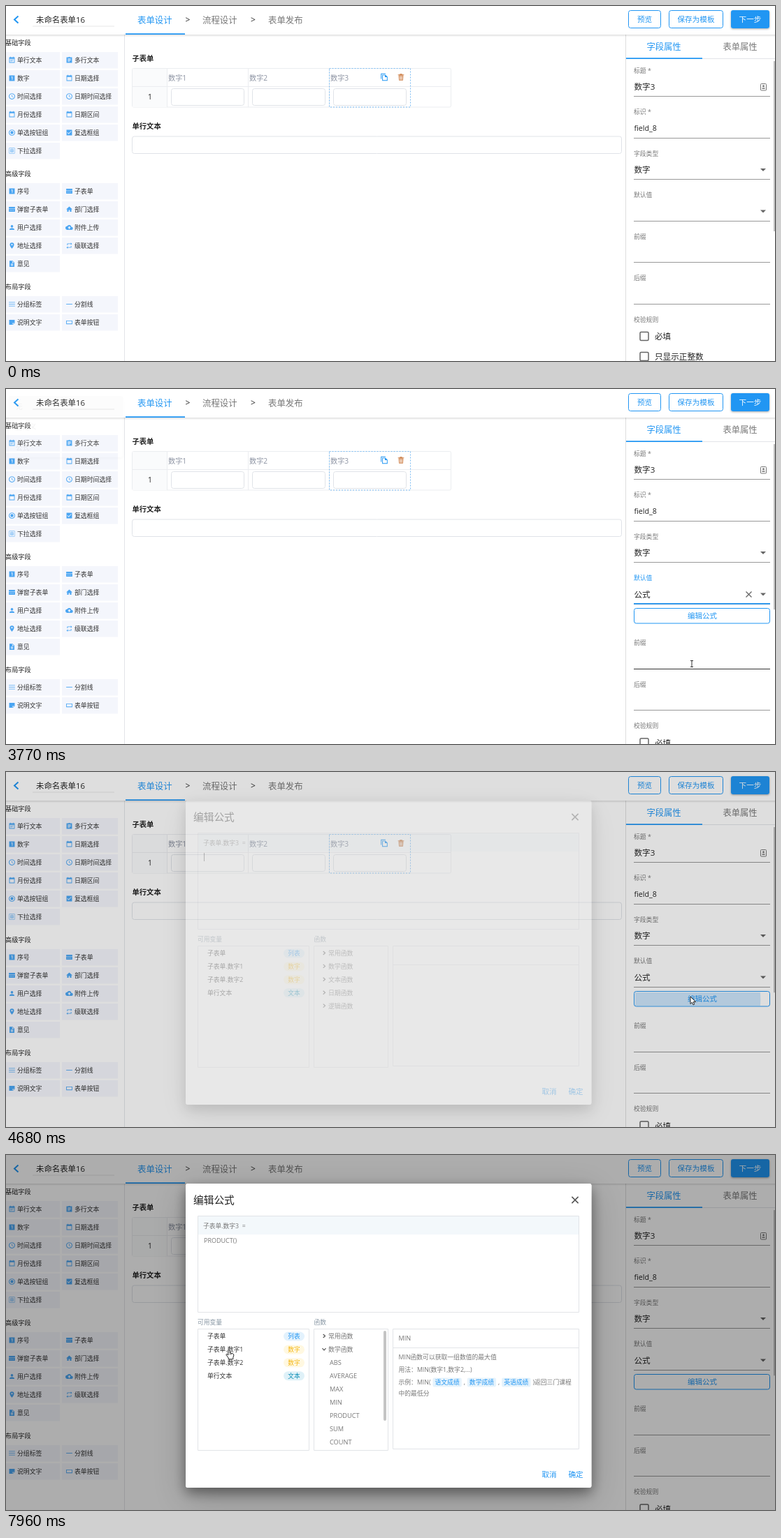
An HTML page with a canvas that plays this animation: 1100x509 px, repeating every 8 s.

```html
<!DOCTYPE html>
<html lang="zh-CN">
<head>
<meta charset="utf-8">
<style>
html, body { margin: 0; width: 100%; height: 100%; overflow: hidden; background: #fff; }
canvas { display: block; width: 1100px; height: 509px; }
</style>
</head>
<body>
<canvas id="stage" width="1100" height="509"></canvas>
<script>
const W = 1100, H = 509, LOOP = 8000;
const stage = document.getElementById('stage').getContext('2d');
const sheet = new OffscreenCanvas(W, H).getContext('2d');
let ctx = stage;
const BLUE = '#2196f3', INK = '#222', GREY = '#777', LINE = '#e2e4e8';

// Times of the hard changes, in ms
const T = { menuOpen: 2270, choose: 3520, edit: 4330, dialog: 4500, expand: 5930, insert: 7080 };

const clamp = v => Math.max(0, Math.min(1, v));
const smooth = v => (v = clamp(v), v * v * (3 - 2 * v));
const ramp = (t, start, length) => smooth((t - start) / length);

// ---------- drawing helpers ----------
function setFont(size, weight = 400) {
  ctx.font = `${weight} ${size}px "Open Sans", "Noto Sans CJK SC", "Noto Sans CJK", sans-serif`;
}
function text(str, x, y, size, color = INK, { weight = 400, align = 'left' } = {}) {
  setFont(size, weight);
  ctx.fillStyle = color;
  ctx.textAlign = align;
  ctx.fillText(str, x, y + size * 0.37);
  return ctx.measureText(str).width;
}
function box(x, y, w, h, { fill, stroke, r = 0, dash = [], width = 1 } = {}) {
  ctx.beginPath();
  ctx.roundRect(x, y, w, h, r);
  if (fill) { ctx.fillStyle = fill; ctx.fill(); }
  if (stroke) {
    ctx.strokeStyle = stroke;
    ctx.lineWidth = width;
    ctx.setLineDash(dash);
    ctx.stroke();
    ctx.setLineDash([]);
  }
}
function poly(points, color, width = 1) {
  ctx.beginPath();
  points.forEach(([x, y]) => ctx.lineTo(x, y));
  ctx.strokeStyle = color;
  ctx.lineWidth = width;
  ctx.stroke();
}
function layer(draw) { ctx.save(); draw(); ctx.restore(); }
// Draws on a separate sheet, so that overlapping parts fade as one
function fadeGroup(alpha, draw) {
  ctx = sheet;
  ctx.clearRect(0, 0, W, H);
  layer(draw);
  ctx = stage;
  ctx.globalAlpha = alpha;
  ctx.drawImage(sheet.canvas, 0, 0);
  ctx.globalAlpha = 1;
}
function raisedBox(x, y, w, h, r, shadows) {
  for (const [alpha, blur, dy] of shadows) layer(() => {
    ctx.shadowColor = `rgba(0,0,0,${alpha})`;
    ctx.shadowBlur = blur;
    ctx.shadowOffsetY = dy;
    box(x, y, w, h, { fill: '#fff', r });
  });
}
function cross(x, y, s, color, width) {
  poly([[x - s, y - s], [x + s, y + s]], color, width);
  poly([[x - s, y + s], [x + s, y - s]], color, width);
}
function caretTriangle(x, y, color, up) {
  const d = up ? -2 : 2;
  ctx.beginPath();
  ctx.moveTo(x - 4, y - d); ctx.lineTo(x + 4, y - d); ctx.lineTo(x, y + d);
  ctx.fillStyle = color;
  ctx.fill();
}

// ---------- icons on a 24-unit grid ----------
const CAL = 'M3 3h3V1h2v2h8V1h2v2h3v18H3zM5 8v11h14V8z';
const RING = 'M12 2a10 10 0 1 0 .01 0zM12 4a8 8 0 1 1-.01 0z';
const ICONS = {
  cal: CAL,
  event: CAL + 'M7 10h10v2H7zM7 14h7v2H7z',
  clip: 'M3 3h6l3-2 3 2h6v18H3zM7 7v2h10V7zM7 11v2h10v-2zM7 15v2h7v-2z',
  one: 'M3 3h18v18H3zM10 7v2h2v8h2V7z',
  clock: RING + 'M11 7h1.6v5l4 2.4-.8 1.3-4.8-2.9z',
  radio: RING + 'M12 7a5 5 0 1 0 .01 0z',
  check: 'M3 3h18v18H3zM10 17l9-9-1.4-1.4-7.6 7.6-3.6-3.6L5 12z',
  select: 'M3 3h18v18H3zM4 4v16h16V4zM8 7h8v1.3H8zM8 11h8v1.3H8zM8 15h8v1.3H8zM7 7h1v10H7zM16 7h1v10h-1z',
  table: 'M2 4h20v16H2zM2 9h20v1.5H2zM5 14h3v2H5zM10 14h3v2h-3zM15 14h3v2h-3z',
  home: 'M10 20v-6h4v6h5v-8h3L12 3 2 12h3v8z',
  person: 'M12 4a4 4 0 1 0 .01 0zM4 20v-2c0-3 5-4 8-4s8 1 8 4v2z',
  cloud: 'M19 10a7.5 7.5 0 0 0-14-2A6 6 0 0 0 6 20h13a5 5 0 0 0 0-10zM14 13v4h-4v-4H7l5-5 5 5z',
  pin: 'M12 2a7 7 0 0 0-7 7c0 5 7 13 7 13s7-8 7-13a7 7 0 0 0-7-7zM12 6.5a2.5 2.5 0 1 1-.01 0z',
  repeat: 'M7 7h10v3l4-4-4-4v3H5v6h2zM17 17H7v-3l-4 4 4 4v-3h12v-6h-2z',
  doc: 'M4 2h10l6 6v14H4zM8 12v2h8v-2zM8 16v2h8v-2zM13 3.5V9h5.5z',
  lines: 'M2 5h20v1.7H2zM2 11h20v1.7H2zM2 17h20v1.7H2z',
  minus: 'M2 11h20v2H2z',
  note: 'M3 4h18v11l-6 5H3zM14 19v-5h6z',
  button: 'M2 6h20v12H2zM4 8v8h16V8z',
  copy: 'M16 1H2v16h2V3h12zM6 5h10l6 6v12H6zM8 7v14h12v-9h-6V7z',
  trash: 'M3 4h5V2h8v2h5v2H3zM5 7h14l-1 15H6zM8 9v11h1.7V9zM11.2 9v11h1.7V9zM14.4 9v11H16V9z'
};
for (const name in ICONS) ICONS[name] = new Path2D(ICONS[name]);
function icon(name, cx, cy, size, color) {
  layer(() => {
    ctx.translate(cx - size / 2, cy - size / 2);
    ctx.scale(size / 24, size / 24);
    ctx.fillStyle = color;
    ctx.fill(ICONS[name], 'evenodd');
  });
}

// ---------- pointer ----------
const POINTERS = {
  arrow: new Path2D('M0 0v10.5l2.4-2.3 1.6 3.6 1.8-.8-1.6-3.4h3.4z'),
  hand: new Path2D('M-1.2.6q1.2-1.6 2.4 0v4.2l4.2 1q1.6.5 1.4 2.4l-1 3.4v2.2H-.8v-1.8L-4 7.6q-.2-1.8 1.6-.8l1.2 1.2z')
};
const PATH = [
  [260, 1005, 485, 'arrow'], [950, 522, 94, 'hand'], [1080, 527, 92, 'hand'], [1280, 527, 92, 'hand'],
  [2060, 1000, 296, 'hand'], [2270, 1000, 296, 'hand'], [2540, 996, 327, 'hand'], [2680, 996, 327, 'hand'],
  [2960, 985, 364, 'hand'], [3160, 985, 364, 'hand'], [3300, 982, 396, 'hand'], [3560, 981, 394, 'text'],
  [3850, 981, 394, 'text'], [4000, 980, 350, 'hand'], [4220, 979, 322, 'hand'], [4420, 979, 322, 'arrow'],
  [4700, 979, 322, 'arrow'], [5080, 580, 305, 'arrow'], [5300, 500, 285, 'hand'], [5600, 478, 276, 'hand'],
  [6000, 478, 276, 'hand'], [6660, 501, 376, 'hand'], [7150, 501, 376, 'hand'],
  [7820, 316, 293, 'hand'], [7940, 319, 279, 'hand'], [LOOP, 319, 279, 'hand']
];
function pointerAt(t) {
  const i = PATH.findIndex(key => key[0] > t);
  if (i < 1) return null;
  const [t0, x0, y0, kind] = PATH[i - 1], [t1, x1, y1] = PATH[i];
  const k = smooth((t - t0) / (t1 - t0));
  return { x: x0 + (x1 - x0) * k, y: y0 + (y1 - y0) * k, kind };
}
function drawPointer({ x, y, kind }) {
  layer(() => {
    ctx.translate(x, y);
    if (kind === 'text') {
      for (const s of [-1, 1]) poly([[-2, 4.5 * s], [2, 4.5 * s]], '#333');
      poly([[0, -4.5], [0, 4.5]], '#333');
      return;
    }
    ctx.fillStyle = '#fff';
    ctx.strokeStyle = '#222';
    ctx.lineWidth = 1;
    ctx.fill(POINTERS[kind]);
    ctx.stroke(POINTERS[kind]);
    if (kind === 'hand') for (const dx of [1.4, 3.2]) poly([[dx, 5.5], [dx, 7.5]], '#333', 0.7);
  });
}

// ---------- page ----------
const PALETTE = [
  ['基础字段', 53, 'event 单行文本,clip 多行文本,one 数字,cal 日期选择,clock 时间选择,clock 日期时间选择,cal 月份选择,cal 日期区间,radio 单选按钮组,check 复选框组,select 下拉选择'],
  ['高级字段', 241, 'one 序号,table 子表单,table 弹窗子表单,home 部门选择,person 用户选择,cloud 附件上传,pin 地址选择,repeat 级联选择,doc 意见'],
  ['布局字段', 403, 'lines 分组标签,minus 分割线,note 说明文字,button 表单按钮']
];

function drawPalette() {
  for (const [title, top, list] of PALETTE) {
    text(title, -1, top, 9.2);
    list.split(',').forEach((item, i) => {
      const [glyph, label] = item.split(' ');
      const right = i % 2, x = right * 82, y = top + 25 + (i >> 1) * 26;
      box(right ? 80 : 0, y - 12, right ? 80 : 77, 23.5, { fill: '#f4f6fc' });
      icon(glyph, x + 8.5, y - 0.5, 10.5, '#4aa5f2');
      text(label, x + 16, y, 8.9, '#333');
    });
  }
  poly([[169.5, 41], [169.5, H]], LINE);
}

function drawHeader() {
  raisedBox(-5, -5, W + 10, 46, 0, [[0.18, 3, 1]]);
  poly([[17.5, 14.5], [12, 19.5], [17.5, 24.5]], BLUE, 2);
  text('未命名表单16', 43, 19.5, 11.4);
  box(38, 29, 117, 0, { stroke: '#ddd', dash: [1, 1], width: 0.7 });
  text('表单设计', 188, 20, 12.4, BLUE);
  text('流程设计', 281, 20, 12.4, GREY);
  text('表单发布', 375, 20, 12.4, GREY);
  for (const x of [260, 353.5]) text('>', x, 20, 12, '#333', { align: 'center' });
  box(171, 39.3, 85, 1.7, { fill: BLUE });
  box(890.5, 6.5, 46, 25, { stroke: BLUE, r: 3 });
  box(948.5, 6.5, 77, 25, { stroke: BLUE, r: 3 });
  layer(() => {
    raisedBox(1037, 6, 55, 26, 3, [[0.35, 3, 1]]);
    box(1037, 6, 55, 26, { fill: BLUE, r: 3 });
  });
  const center = { align: 'center' };
  text('预览', 913.5, 19, 10.6, BLUE, center);
  text('保存为模板', 987, 19, 10.6, BLUE, center);
  text('下一步', 1064.5, 19, 10.6, '#fff', center);
}

function drawForm() {
  text('子表单', 180.5, 75, 10.3, INK, { weight: 700 });
  box(180.5, 89.5, 456, 55.5, { stroke: '#ebedf0', r: 2 });
  box(181, 90, 49, 55, { fill: '#fafbfc' });
  poly([[181, 115.5], [636, 115.5]], '#ebedf0');
  text('1', 206, 130.5, 10.3, INK, { align: 'center' });
  [230.5, 346.5, 462.5].forEach((x, i) => {
    poly([[x, 90], [x, 145]], '#ebedf0');
    text('数字' + (i + 1), x + 1.5, 103, 10.2, '#8d94a3');
    box(x + 6, 118.5, 104, 24, { stroke: '#e0e3e8', fill: '#fff', r: 3 });
  });
  box(462.5, 89.5, 116, 55.5, { stroke: '#7cbdf3', dash: [2, 2] });
  icon('copy', 541, 102, 11.5, BLUE);
  icon('trash', 565, 102, 11.5, '#d08550');
  text('单行文本', 180.5, 172, 10.3, INK, { weight: 700 });
  box(180.5, 187, 700, 24.5, { stroke: '#e0e3e8', r: 3 });
}

function drawProperties(t, pointer) {
  const chosen = t >= T.choose + 40;
  const focused = t >= T.menuOpen && t < T.edit + 70;
  const shift = chosen ? 33.5 : 0;
  const inField = y => pointer && pointer.x > 898 && pointer.x < 1093 && pointer.y > y - 33 && pointer.y < y;

  poly([[886.5, 41], [886.5, H]], '#ddd');
  text('字段属性', 941, 58, 12.3, BLUE, { align: 'center' });
  text('表单属性', 1050, 58, 12.3, GREY, { align: 'center' });
  poly([[887, 75.5], [W, 75.5]], LINE);
  box(887, 74.3, 109, 1.7, { fill: BLUE });
  box(1098, 79, 2, 244 - shift / 5, { fill: '#c1c1c1' });

  ['标题 *', '标识 *', '字段类型', '默认值', '前缀', '后缀', '校验规则'].forEach((label, i) => {
    const y = 93 + i * 59.5 + (i > 3 ? shift : 0);
    const active = i === 3 && focused;
    text(label, 898, y - 0.5, 8.8, active ? BLUE : GREY);
    if (i === 6) return;
    const bottom = Math.round(y + 37) - 0.5;
    const hovered = inField(bottom) && t < T.edit;
    poly([[898, bottom], [1093, bottom]], hovered ? '#333' : '#999');
  });
  ['数字3', 'field_8', '数字', chosen ? '公式' : ''].forEach((value, i) =>
    text(value, 898.5, 116 + i * 59.5, i === 1 ? 10.6 : 11.6));

  box(1079.5, 111.5, 8, 9.5, { stroke: '#777', r: 1 });
  box(1082, 113.2, 3, 3, { fill: '#777', r: 1.5 });
  box(1081.5, 117.3, 4, 1.6, { fill: '#777' });
  caretTriangle(1083, 235, '#666');
  const menuUp = focused && !chosen;
  caretTriangle(menuUp ? 1082 : 1083, 294.5, menuUp ? BLUE : '#666', menuUp);
  if (chosen && focused) cross(1062.5, 294.5, 4, '#666', 1.2);
  if (focused) {
    const half = 97.5 * ramp(t, T.menuOpen, 250);
    box(995.5 - half, 307, half * 2, 1.7, { fill: BLUE });
  }
  if (chosen) drawEditButton(t);

  ['必填', '只显示正整数'].forEach((label, i) => {
    const y = 473.5 + i * 29 + shift;
    box(907, y - 6, 12, 12, { stroke: '#666', r: 1.5, width: 1.5 });
    text(label, 928, y + 0.5, 11.6);
  });
}

function drawEditButton(t) {
  box(898.5, 314.5, 194, 21.5, { fill: '#fff', stroke: BLUE, r: 3 });
  const fade = 1 - ramp(t, 4640, 260);
  if (t > T.edit && fade > 0) layer(() => {
    ctx.beginPath();
    ctx.rect(900, 316, 191, 19);
    ctx.clip();
    ctx.globalAlpha = 0.24 * fade;
    ctx.beginPath();
    ctx.arc(979, 326, (t - T.edit) * 80 / 280, 0, 7);
    ctx.fillStyle = BLUE;
    ctx.fill();
  });
  text('编辑公式', 996, 325.5, 10.5, BLUE, { align: 'center' });
}

function drawMenu(x, y, scale) {
  ctx.translate(x, y);
  ctx.scale(scale, scale);
  raisedBox(0, 0, 195, 105, 3, [[0.35, 5, 2]]);
  box(0, 0, 195, 35, { fill: '#e0e0e0', r: [3, 3, 0, 0] });
  ['无', '自定义', '公式'].forEach((label, i) => text(label, 12, 18.5 + i * 35, 11.6));
}

// ---------- formula dialog ----------
const SCORES = '[语文成绩],[数学成绩],[英语成绩]';
const FUNCTIONS = [
  ['ABS', '获取一个数的绝对值', '数字', '(-8)可以返回8,也就是-8的绝对值', ''],
  ['AVERAGE', '获取一组数值的算术平均值', '数字1,数字2,...', `(${SCORES})返回三门课程`, '的平均分'],
  ['MAX', '获取一组数值的最大值', '数字1,数字2,...', `(${SCORES})返回三门课程`, '中的最高分'],
  ['MIN', '获取一组数值的最大值', '数字1,数字2,...', `(${SCORES})返回三门课程`, '中的最低分'],
  ['PRODUCT', '获取一组数值的乘积', '数字1,数字2,...', '([单价],[数量]),获取总价，也就是单价和数量', '的乘积'],
  ['SUM'], ['COUNT']
];
const ROW = 18.9;

function flowText(parts, x, y) {
  for (const part of parts.split(/(\[.*?\])/)) {
    if (part[0] !== '[') {
      x += text(part, x, y, 8.8, GREY) + 3;
      continue;
    }
    const label = part.slice(1, -1);
    setFont(8.8);
    const w = ctx.measureText(label).width + 6;
    box(x, y - 6.5, w, 13, { fill: '#e6f3fc', r: 2 });
    text(label, x + 3, y, 8.8, BLUE);
    x += w + 3;
  }
}

function drawDocs([name, purpose, args, example, rest]) {
  text(name, 561.5, 263, 9.2, GREY);
  if (!purpose) return;
  text(`${name}函数可以${purpose}`, 561.5, 289.5, 8.8, GREY);
  text(`用法：${name}(${args})`, 561.5, 308, 8.8, GREY);
  flowText(`示例：${name}${example}`, 561.5, 326);
  text(rest, 561.5, 341.5, 8.8, GREY);
}

function chevron(x, y, open) {
  const tip = open ? [[-2.5, -1.2], [0, 1.5], [2.5, -1.2]] : [[-1.3, -2.5], [1.5, 0], [-1.3, 2.5]];
  poly(tip.map(([dx, dy]) => [x + dx, y + dy]), '#555', 1.2);
}

function drawFunctionList(t, hovered) {
  const open = ramp(t, T.expand, 220);
  layer(() => {
    ctx.beginPath();
    ctx.rect(441, 250, 105, 172.5);
    ctx.clip();
    ['常用函数', '数学函数', '文本函数', '日期函数', '逻辑函数'].forEach((label, i) => {
      const y = 260 + i * ROW + (i > 1 ? open * 9 * ROW : 0);
      chevron(455, y - 0.5, i === 1 && t > T.expand);
      text(label, 461, y, 8.9, GREY);
    });
    ctx.beginPath();
    ctx.rect(441, 288, 105, open * 9 * ROW);
    ctx.clip();
    FUNCTIONS.forEach(([name], i) => {
      const y = 298 + i * ROW;
      if (i === hovered) box(441, y - 9.3, 105, ROW, { fill: '#e4f3f2' });
      text(name, 463, y, 9.2, GREY);
    });
  });
  if (open > 0.5) box(540, 252, 4, 129, { fill: '#c4c4c4', r: 2 });
}

function drawDialog(t, pointer) {
  raisedBox(257, 41, 580.5, 436, 3, [[0.22, 46, 14], [0.4, 18, 7]]);
  text('编辑公式', 268, 65, 14.7);
  cross(814, 64.5, 4.6, '#555', 1.5);

  box(275, 88, 545, 26, { fill: '#f3f8fb' });
  box(274.5, 87.5, 545, 138, { stroke: LINE });
  text('子表单.数字3  =', 282, 101.5, 8.75, GREY);
  const inserted = t >= T.insert;
  const caretX = inserted ? 283 + text('PRODUCT()', 283, 122.5, 9, GREY) - 3 : 283;
  const focusStart = inserted ? T.insert : T.dialog + 30;
  const editing = inserted || t < T.expand;
  if (editing && (t - focusStart) % 1060 < 530) poly([[caretX + 0.5, 116], [caretX + 0.5, 128]], '#555');

  text('可用变量', 274, 240, 8.75, '#8796a3');
  text('函数', 440.5, 240, 8.75, '#8796a3');
  box(274.5, 249.5, 159, 174, { stroke: LINE });
  box(440.5, 249.5, 106, 174, { stroke: LINE });
  box(553.5, 249.5, 266, 172, { stroke: LINE });
  poly([[554, 276.5], [820, 276.5]], LINE);

  const listTag = ['列表', '#e3f2fd', '#2196f3'];
  const numberTag = ['数字', '#fff8e1', '#f5b714'];
  const textTag = ['文本', '#dff1f8', '#0b8db5'];
  [['子表单', listTag], ['子表单.数字1', numberTag], ['子表单.数字2', numberTag], ['单行文本', textTag]]
    .forEach(([label, [kind, fill, color]], i) => {
      const y = 260 + i * ROW;
      text(label, 288, y, 8.8, '#333');
      box(397, y - 6.5, 30, 13, { fill, r: 6.5 });
      text(kind, 412, y, 8.7, color, { align: 'center' });
    });

  // The last function passed by the pointer keeps its help text
  const inside = pointer.x > 441 && pointer.x < 547;
  const row = t < T.expand ? -1 : Math.floor(((inside ? pointer.y : 349) - 288.5) / ROW);
  drawFunctionList(t, inside ? row : -1);
  if (FUNCTIONS[row]) drawDocs(FUNCTIONS[row]);

  text('取消', 766.5, 458, 10.6, BLUE);
  text('确定', 804.5, 458, 10.6, BLUE);
}

function draw(t) {
  const pointer = pointerAt(t);
  ctx.fillStyle = '#fff';
  ctx.fillRect(0, 0, W, H);
  drawPalette();
  drawForm();
  drawProperties(t, pointer);
  drawHeader();

  const leaving = clamp((t - T.choose - 30) / 270);
  if (t >= T.menuOpen && leaving === 0) {
    const entering = ramp(t, T.menuOpen, 260);
    fadeGroup(entering, () => drawMenu(898, 314, 0.8 + 0.2 * entering));
  } else if (leaving > 0 && leaving < 1) {
    // Its anchor is gone, so the closing menu fades in the corner
    fadeGroup((1 - leaving) ** 1.6, () => drawMenu(4, 10, 1 - 0.2 * leaving));
  }
  if (t >= T.dialog) {
    ctx.fillStyle = `rgba(0,0,0,${0.32 * clamp((t - T.dialog) / 450)})`;
    ctx.fillRect(0, 0, W, H);
    fadeGroup(ramp(t, T.dialog, 480), () => drawDialog(t, pointer));
  }
  if (pointer) drawPointer(pointer);
}

function frame(now) {
  draw(now % LOOP);
  requestAnimationFrame(frame);
}
requestAnimationFrame(frame);
</script>
</body>
</html>
```
